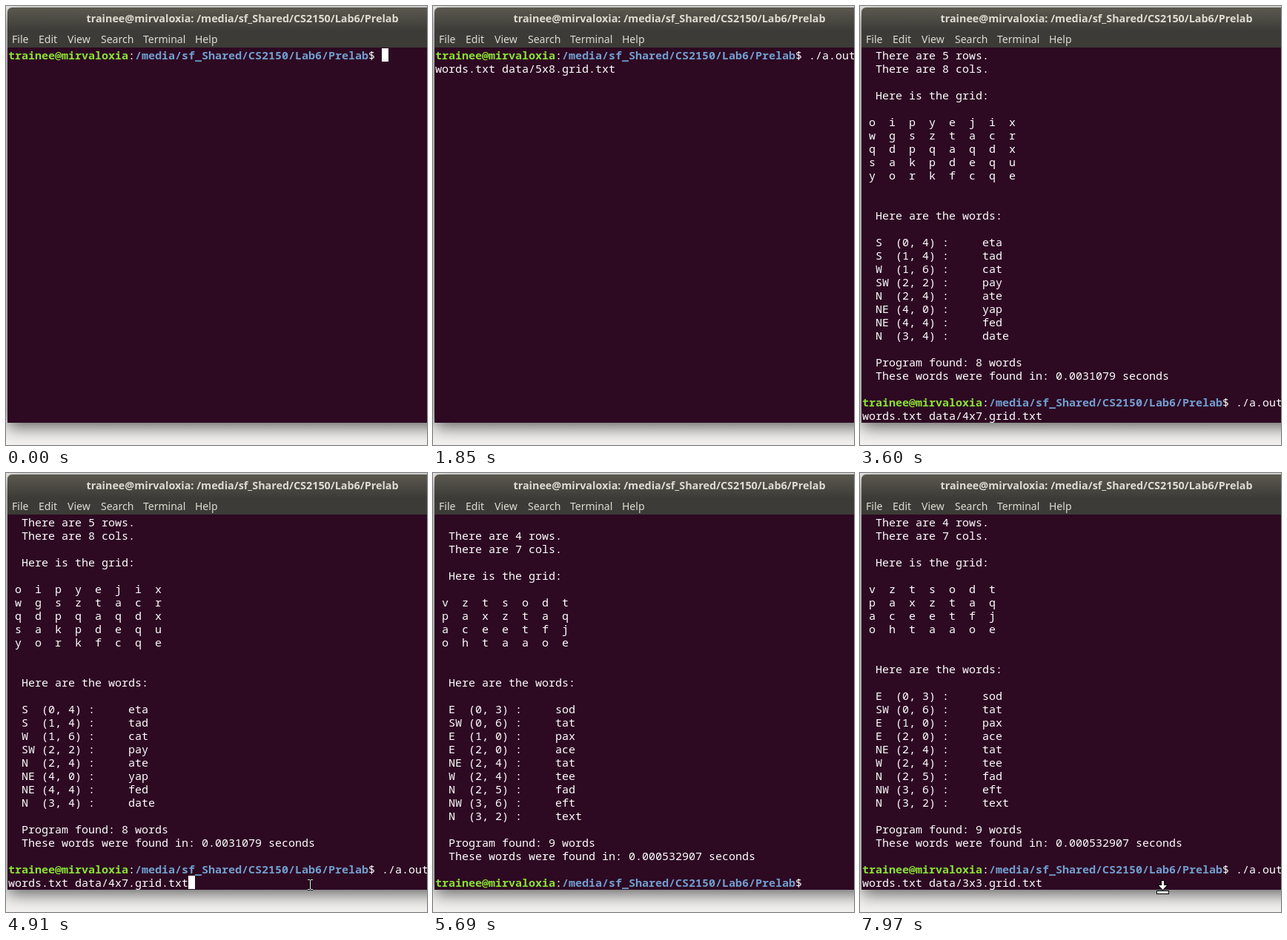
An HTML page with a canvas that plays this animation: 568x592 px, repeating every 8000 ms.

```html
<!DOCTYPE html>
<html lang="en">
<head>
<meta charset="utf-8">
<title>Word puzzle in a terminal</title>
<style>
  html, body { margin: 0; width: 100%; height: 100%; overflow: hidden; background: #f2f1f0; }
  canvas { display: block; }
</style>
</head>
<body>
<canvas id="stage" width="568" height="592"></canvas>
<script>
const ctx = document.getElementById('stage').getContext('2d');
const LOOP = 8000, COLS = 64, ROWS = 28, CELL = 9, LINE = 18, LEFT = 3, TOP = 57;
const MONO = '15px "Noto Sans Mono", "DejaVu Sans Mono", monospace';
const SANS = '"Noto Sans", "Open Sans", sans-serif';
const USER = 'trainee@mirvaloxia', DIR = '/media/sf_Shared/CS2150/Lab6/Prelab';
const PROMPT = `${USER}:${DIR}$ `;

// Each run: when the command is complete, when Enter is pressed, and its data.
const runs = [
  { typed: 1300, enter: 2620, size: '5x8', time: '0.0031079',
    grid: 'oipyejix wgsztacr qdpqaqdx sakpdequ yorkfcqe',
    words: 'S04eta S14tad W16cat SW22pay N24ate NE40yap NE44fed N34date' },
  { typed: 3600, enter: 5030, size: '4x7', time: '0.000532907',
    grid: 'vztsodt paxztaq aceetfj ohtaaoe',
    words: 'E03sod SW06tat E10pax E20ace NE24tat W24tee N25fad NW36eft N32text' },
  { typed: 6240, enter: Infinity, size: '3x3' }
];

// The block cursor starts visible and flips at each of these times.
const blinks = [430, 980, 1850, 2510, 3170, 3700, 4250, 4910, 5690, 6240, 6880, 7430, 7970];

// Pointer: start, end, hidden at, from x, y, to x, y
const moves = [
  [100, 430, 980, 443, 495, 460, 442],
  [2510, 3170, 3170, 460, 442, 430, 610],
  [3920, 4360, 4910, 432, 582, 410, 555],
  [4910, 5470, 5470, 410, 555, 430, 610],
  [6440, 6770, 6770, 440, 595, 454, 568],
  [6770, 7000, 7000, 454, 568, 432, 610],
  [7650, 7970, 8000, 428, 574, 408, 559]
];

function output({ size, grid, words, time }) {
  const [rows, cols] = size.split('x');
  const found = words.split(' ').map(w => {
    const [, dir, r, c, word] = w.match(/([A-Z]+)(\d)(\d)(.+)/);
    return `  ${dir.padEnd(3)}(${r}, ${c}) :     ${word}`;
  });
  return ['', `  There are ${rows} rows.`, `  There are ${cols} cols.`, '',
    '  Here is the grid:', '', ...grid.split(' ').map(g => ' ' + [...g].join('  ')), '', '',
    '  Here are the words:', '', ...found, '',
    `  Program found: ${found.length} words`,
    `  These words were found in: ${time} seconds`, ''];
}

function screenLines(t) {
  const lines = [];
  for (const run of runs) {
    let cmd = `./a.out words.txt data/${run.size}.grid.txt`;
    if (t < run.typed) cmd = run === runs[0] ? cmd.slice(0, t < 980 ? 0 : t < 1080 ? 2 : 5) : '';
    const text = PROMPT + cmd;
    lines.push(text.slice(0, COLS));
    if (text.length > COLS) lines.push(text.slice(COLS));
    if (t < run.enter) break;
    lines.push(...output(run));
  }
  return lines.slice(-ROWS);
}

function label(text, x, y, font, color) {
  ctx.font = font;
  ctx.fillStyle = color;
  ctx.fillText(text, x, y);
}

function drawWindow() {
  ctx.fillStyle = '#f2f1f0';
  ctx.fillRect(0, 0, 568, 592);
  ctx.save();
  ctx.shadowColor = 'rgba(0,0,0,.6)';
  ctx.shadowBlur = 22;
  ctx.shadowOffsetY = 6;
  const bar = ctx.createLinearGradient(0, 2, 0, 34);
  bar.addColorStop(0, '#5b594f');
  bar.addColorStop(1, '#3c3b37');
  ctx.fillStyle = bar;
  ctx.beginPath();
  ctx.roundRect(2, 2, 700, 560, [6, 0, 0, 0]);
  ctx.fill();
  ctx.restore();
  ctx.fillStyle = '#2d0922';
  ctx.fillRect(2, 56, 566, 506);

  ctx.textAlign = 'center';
  label(`${USER}: ${DIR}`, 319, 22, `bold 14.35px ${SANS}`, '#dfdbd2');
  ctx.textAlign = 'left';
  const menu = { File: 8, Edit: 44, View: 83, Search: 128, Terminal: 185, Help: 255 };
  for (const name in menu) label(name, menu[name], 50, `14px ${SANS}`, '#dfdbd2');
}

function drawLine(text, row) {
  const y = TOP + 15 + row * LINE;
  let col = 0;
  const put = (s, color, bold = '') => {
    label(s, LEFT + col * CELL, y, bold + MONO, color);
    col += s.length;
  };
  if (text.startsWith(PROMPT)) {
    put(USER, '#8ae234', 'bold ');
    put(':', '#fff');
    put(DIR, '#729fcf', 'bold ');
    text = text.slice(col);
  }
  put(text, '#fff');
}

function outlined(path, x, y, fill, edge, line) {
  ctx.save();
  ctx.translate(x, y);
  const shape = new Path2D(path);
  ctx.lineWidth = edge;
  ctx.strokeStyle = '#000';
  ctx.stroke(shape);
  ctx.fillStyle = ctx.strokeStyle = fill;
  if (line) {
    ctx.lineWidth = 1;
    ctx.stroke(shape);
  } else ctx.fill(shape);
  ctx.restore();
}

function drawPointer(t) {
  const move = moves.find(m => t >= m[0] && t < m[2]);
  if (!move) return;
  const [start, end, , x0, y0, x1, y1] = move;
  const steps = Math.round((end - start) / 110);
  const p = Math.min(1, Math.floor((t - start) / (end - start) * steps + 1e-6) / steps);
  const x = Math.round(x0 + (x1 - x0) * p), y = Math.round(y0 + (y1 - y0) * p);
  if (y < 557) outlined('M-3 -6.5H0M1 -6.5H4M.5 -6V6M-3 6.5H0M1 6.5H4', x, y, '#fff', 3, true);
  else if (y < 570) outlined('M-1 -9H2V-3H6L.5 3L-5 -3H-1ZM-7 5H8V8H-7Z', x, y, '#fff', 2);
  else outlined('M0 0V14L3 11L5.5 16L8 15L5.5 10H10Z', x, y, '#000', 1);
}

function draw(t) {
  drawWindow();
  const lines = screenLines(t);
  lines.forEach(drawLine);
  if (blinks.filter(b => b <= t).length % 2 === 0) {
    ctx.fillStyle = '#fff';
    ctx.fillRect(LEFT + lines.at(-1).length * CELL, TOP + (lines.length - 1) * LINE, CELL, LINE);
  }
  drawPointer(t);
}

const began = performance.now();
function tick() {
  draw((performance.now() - began) % LOOP);
  requestAnimationFrame(tick);
}
tick();
</script>
</body>
</html>
```
